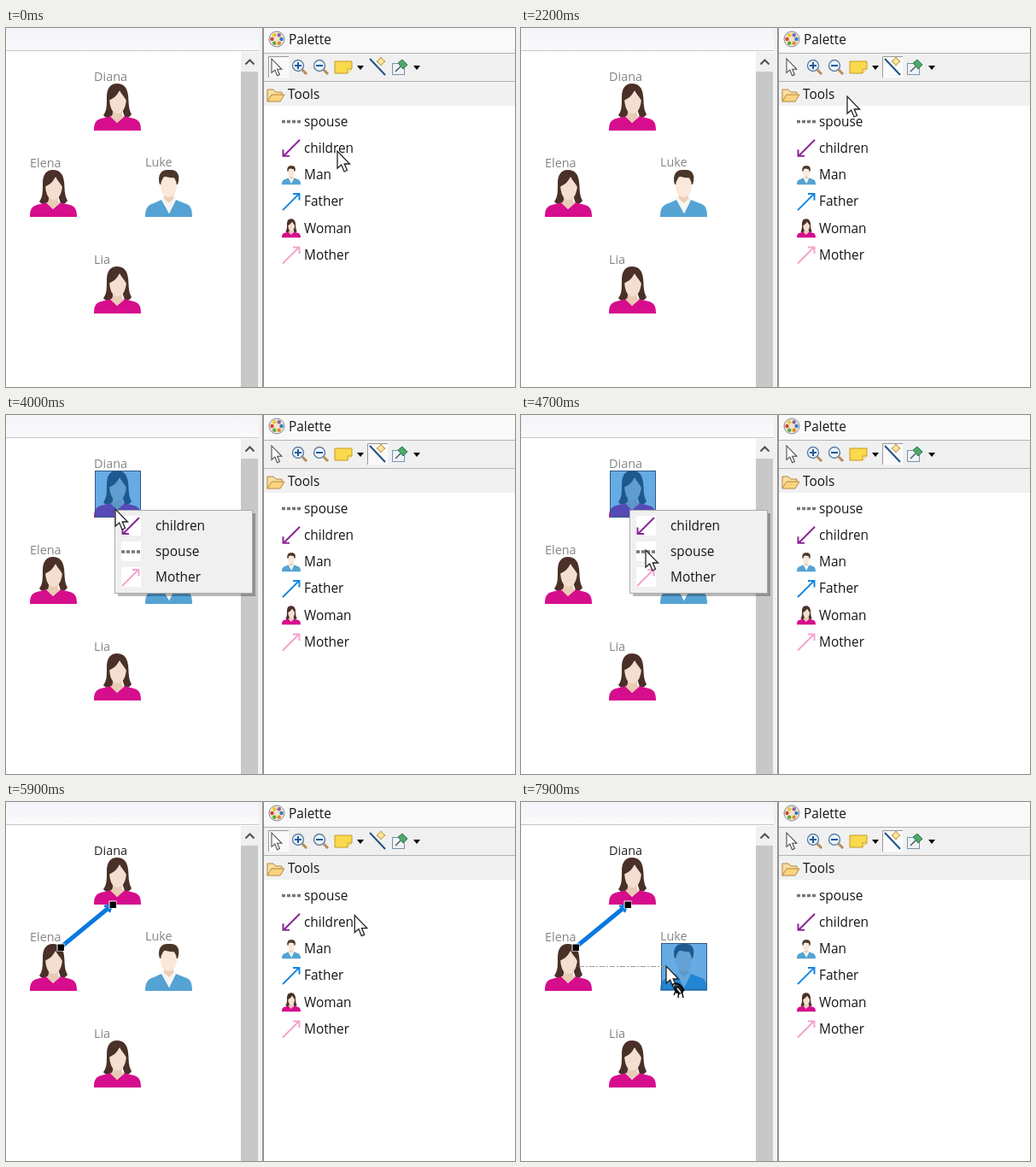
Animation of 596x420 px, one loop 8 s. Source, as an HTML page:

```html
<!DOCTYPE html>
<html lang="en">
<head>
<meta charset="utf-8">
<title>Connection tool</title>
<style>
html, body { margin: 0; width: 100%; height: 100%; overflow: hidden; background: #fff; }
svg { display: block; width: 596px; height: 420px; }
text { font: 15.4px "Open Sans", "Noto Sans", sans-serif; fill: #161616; }
.label { font-size: 14.4px; fill: #858585; }
.tip { font-size: 14px; }
.thin { fill: none; stroke: #999; stroke-width: 1; }
</style>
</head>
<body>
<svg viewBox="0 0 596 420">
  <defs>
    <linearGradient id="tab" x2="0" y2="1"><stop stop-color="#f3f4f8"/><stop offset="1" stop-color="#fafafc"/></linearGradient>
    <g id="woman">
      <path fill="#4a3028" d="M27 0C18 0 15 7 15 16C15 26 15 32 11 37C14 41 18 41 21 39L23 30H33L36 39C39 41 42 39 44 36C40 29 41 22 40 14C39 5 35 0 27 0Z"/>
      <path fill="#d60d8c" d="M0 55C0 46 2 43 8 41L20 38L27 46L35 38L47 41C53 43 55 46 55 55Z"/>
      <path fill="#e9cbb6" d="M22 27V37L19 38.500L27 46L36 38.500L33 37V27Z"/>
      <path fill="#f3dfcf" d="M18 15C18 27 21 35 27.500 35C34 35 38 27 38 16L31 8Z"/>
      <path fill="#4a3028" d="M17 20C24 17 28 13 30 7C31 12 36 15 39 22C40 8 35 3 28 3C20 3 16 10 17 20Z"/>
    </g>
    <g id="man">
      <path fill="#4a3629" d="M17 18C14 6 19 0 28 1C37 0 42 6 38 18Z"/>
      <path fill="#55a3d4" d="M0 56C0 46 3 42 10 40L19 36L28 52L36 36L46 40C53 42 55 46 55 56Z"/>
      <path fill="#f8f5f2" d="M19 35L28 52L36 35L34 31H21Z"/>
      <path fill="#ebcfb9" d="M22 28V35L28 40L33 35V28Z"/>
      <ellipse cx="27.5" cy="20" rx="9.5" ry="13" fill="#fae8da"/>
      <path fill="#4a3629" d="M17 17C15 6 20 2 28 2C36 2 40 7 38 17L35 10C30 11 25 9 21 8Z"/>
    </g>
    <!-- Arrow icon in a 22px box, pointing up and right -->
    <path id="arrow" d="M1 21L20 2M13 2H20.5V9.500" fill="none" stroke-width="2"/>
    <path id="dashes" d="M0 11H22" stroke="#777" stroke-width="3.5" stroke-dasharray="4 2"/>
    <path id="pointer" d="M0 0V20L4.7 16L8 24L11.5 22.5L8.2 15H14.5Z" fill="#fff" stroke="#222" stroke-width="1.3"/>
    <g id="handle"><rect x="-5" y="-5" width="9" height="9" fill="#fff"/><rect x="-4" y="-4" width="7.5" height="7.5"/></g>
    <g id="lens" fill="none">
      <path d="M5 5L10 10" stroke="#b98a55" stroke-width="3"/>
      <circle r="6.5" fill="#eaf4fc" stroke="#5f7f9d" stroke-width="1.4"/>
      <path d="M-4 0H4" stroke="#1d5a9a" stroke-width="2"/>
    </g>
    <path id="drop" d="M-4 -2H4L0 3Z"/>
    <g id="plug" stroke="#000" fill="none">
      <path d="M7 22Q13 18 18 24L21 29M9 25L13 32" stroke-width="1.8"/>
      <path d="M10 25L16 22L20 30L15 33Z" fill="#222"/>
      <path d="M12 27L9 34M15 28L14 37M18 28L20 37" stroke-width="1.4"/>
      <path d="M13 26L17 31" stroke="#fff" stroke-width="1.5"/>
    </g>
    <g id="forbidden" fill="#fff" stroke="#000" stroke-width="2.8">
      <circle cx="29.500" cy="11.500" r="7.7"/><path d="M24 17L35 6"/>
    </g>
  </defs>

  <rect width="596" height="420" fill="#fff"/>
  <rect width="297" height="26" fill="url(#tab)"/>
  <path d="M0 26.5H297" stroke="#c3c5c9"/>
  <rect x="275" y="28" width="21" height="392" fill="#f0f0f0"/>
  <rect id="thumb" x="275" y="51" width="20" height="369"/>
  <path d="M280.500 42.500L285.5 37.5L290.500 42.500" fill="none" stroke="#505050" stroke-width="2"/>
  <rect x="296" width="5" height="420" fill="#f1f1f1"/>

  <rect x="301" width="295" height="29" fill="#f9f9fa"/>
  <rect x="301" y="30" width="295" height="32" fill="#f0f0f0"/>
  <rect x="301" y="63" width="295" height="28" fill="#f1f1f2"/>
  <path d="M301 29.5H596M301 62.5H596" stroke="#b4b4b4"/>
  <path d="M301 0V420" stroke="#929292" stroke-width="2"/>
  <circle cx="317" cy="13" r="9" fill="#f1e6c8" stroke="#7d8da8"/>
  <g id="paints"></g>
  <text x="331" y="19">Palette</text>

  <g id="pressed">
    <rect x=".5" y="33.5" width="23" height="24" fill="#f9f9f9" stroke="#fff"/>
    <path d="M.5 58V33.5H24" fill="none" stroke="#999"/>
  </g>
  <g opacity=".8"><use href="#pointer" transform="translate(311 36) scale(.82)"/></g>
  <use href="#lens" x="342" y="44"/><path d="M342 40V48" stroke="#1d5a9a" stroke-width="2"/>
  <use href="#lens" x="367" y="44"/>
  <path d="M385 39H405V48L400 53H385Z" fill="#fbd94c" stroke="#c79a2b"/><path d="M405 48H400V53" fill="#fff0a8" stroke="#c79a2b"/>
  <use href="#drop" x="415" y="46"/><use href="#drop" x="481" y="46"/>
  <path d="M426 36L444 55" stroke="#1f5285" stroke-width="2"/>
  <path d="M439 34L441 37L444 39L441 41L439 44L437 41L434 39L437 37Z" fill="#ffe9a0" stroke="#c08c30"/>
  <rect x="452.500" y="41.500" width="14" height="13" fill="#eef3f8" stroke="#7894ab"/>
  <path d="M456 51L462 45" stroke="#555" stroke-width="1.5"/>
  <path d="M459 41L464 37L470 43L465 48Z" fill="#4fa86a" stroke="#287849"/>

  <path d="M306 86V72H313L316 75H323V78" fill="#f7dfa0" stroke="#b78438"/>
  <path d="M306 86L311 78H326L321 86Z" fill="#fbd480" stroke="#b78438"/>
  <text x="330" y="83">Tools</text>
  <g id="tools"></g>
  <g id="people"></g>

  <g id="link">
    <path d="M64 170L123 121.500" stroke="#0878e0" stroke-width="5"/>
    <path d="M115 122L124 120.500L121 129" fill="none" stroke="#0878e0" stroke-width="2.5"/>
    <use href="#handle" x="64.500" y="170.500"/><use href="#handle" x="125.500" y="120.500"/>
  </g>
  <rect id="target" width="53" height="54" fill="#0073d2" fill-opacity=".6" stroke="#315a88"/>
  <path id="edge" class="thin" d="M83.500 165V213" stroke-dasharray="5 2"/>
  <path id="feedback" class="thin" stroke-dasharray="6 2 2 2"/>

  <g id="menu">
    <g id="menuBack">
      <rect x="131" y="115" width="161" height="97" fill="#000" opacity=".28"/>
      <rect x="127.500" y="111.500" width="161" height="97" fill="#f0f0f0" stroke="#aaa"/>
    </g>
    <rect id="hover" x="131" y="174" width="154" height="31" fill="#a9d2f5"/>
    <g id="menuItems"></g>
  </g>

  <g id="tooltip">
    <rect x="438.500" y="60.500" width="170" height="61" fill="#ffffe1" stroke="#777"/>
    <text class="tip" x="444" y="78">Generic connection</text>
    <text class="tip" x="444" y="96">creation tool: select</text>
    <text class="tip" x="444" y="114">source and target</text>
  </g>
  <g id="cursor"><use href="#pointer"/><use id="plugMark" href="#plug"/><use id="noDrop" href="#forbidden"/></g>
</svg>
<script>
const $ = id => document.getElementById(id);
const icon = (name, x, y, extra = "") => `<use href="#${name}" transform="translate(${x} ${y}) ${extra}"/>`;
const toolIcon = {
  spouse: (x, y) => icon("dashes", x, y),
  children: (x, y) => `<g stroke="#8b2797">${icon("arrow", x, y, "rotate(180 11 11)")}</g>`,
  Man: (x, y) => icon("man", x, y, "scale(.4)"),
  Father: (x, y) => `<g stroke="#1385e2">${icon("arrow", x, y)}</g>`,
  Woman: (x, y) => icon("woman", x, y, "scale(.4)"),
  Mother: (x, y) => `<g stroke="#f3a3cc">${icon("arrow", x, y)}</g>`
};
const people = [
  { name: "Diana", kind: "woman", x: 103, y: 65 },
  { name: "Elena", kind: "woman", x: 28, y: 166 },
  { name: "Luke", kind: "man", x: 163, y: 165 },
  { name: "Lia", kind: "woman", x: 103, y: 279 }
];

$("paints").innerHTML = ["#3a78c9", "#e5862d", "#56a845", "#d6453d", "#efc52f", "#8a63b0"].map((color, i) =>
  `<circle cx="${317 + 5.5 * Math.cos(i * Math.PI / 3)}" cy="${13 + 5.5 * Math.sin(i * Math.PI / 3)}" r="2.2" fill="${color}"/>`).join("");
$("tools").innerHTML = Object.keys(toolIcon).map((name, i) =>
  toolIcon[name](323, 98.5 + 31.2 * i) + `<text x="349" y="${114.8 + 31.2 * i}">${name}</text>`).join("");
$("people").innerHTML = people.map(p =>
  icon(p.kind, p.x, p.y) + `<text class="label" x="${p.x}" y="${p.y - 3.5}">${p.name}</text>`).join("");
$("menuItems").innerHTML = ["children", "spouse", "Mother"].map((name, i) =>
  `<g><rect x="135" y="${118 + 30 * i}" width="23" height="23" fill="#fff"/>` +
  toolIcon[name](135, 119 + 30 * i) + `<text x="175" y="${135 + 30 * i}">${name}</text></g>`).join("");
const menuItems = [...$("menuItems").children];
const firstLabel = $("people").querySelector("text");

// Pointer path: time, x, y
const path = [
  [0, 388, 144], [300, 388, 144], [400, 392, 142], [700, 437, 43], [2100, 437, 43], [2200, 382, 80],
  [2500, 200, 130], [2900, 62, 192], [3000, 62, 192], [3200, 93, 163], [3600, 128, 110], [4400, 128, 110],
  [4900, 158, 190], [5300, 158, 190], [6000, 450, 123], [6400, 437, 43], [6600, 437, 43], [6700, 370, 78],
  [6900, 181, 168], [7400, 66, 192], [7500, 66, 192], [7900, 170, 192], [8000, 170, 192]
];
function pointerAt(t) {
  const i = path.findIndex(p => p[0] > t);
  const [t0, x0, y0] = path[i - 1], [t1, x1, y1] = path[i];
  const k = (t - t0) / (t1 - t0);
  return [x0 + (x1 - x0) * k, y0 + (y1 - y0) * k];
}
const within = (t, from, to) => t >= from && t < to;
const show = (id, on) => $(id).style.display = on ? "" : "none";

function draw(t) {
  const [x, y] = pointerAt(t);
  const connecting = within(t, 1900, 5400) || t >= 6400;
  const menuOpen = within(t, 3800, 5200);
  const closing = within(t, 5200, 5400);
  const onCanvas = connecting && x < 275 && !menuOpen && !closing;
  const hit = menuOpen ? people[0] : onCanvas && people.find(p =>
    x >= p.x && x <= p.x + 55 && y >= p.y + 4 && y <= p.y + 55);

  $("cursor").setAttribute("transform", `translate(${x} ${y})`);
  show("plugMark", onCanvas);
  show("noDrop", onCanvas && !hit);
  $("pressed").setAttribute("transform", `translate(${connecting ? 423 : 307} 0)`);
  $("thumb").style.fill = within(t, 6800, 7100) ? "#aaa" : "#c8c8c8";
  show("tooltip", within(t, 1000, 1700));

  show("target", hit && !(t >= 7600 && hit === people[1]));
  if (hit) $("target").setAttribute("transform", `translate(${hit.x + 1.5} ${hit.y + .5})`);
  show("edge", within(t, 3200, 3300));
  show("feedback", within(t, 3300, 3800) || t >= 7600);
  $("feedback").setAttribute("d", `M68 192.500L${x} ${y + .5}`);

  show("menu", menuOpen || closing);
  show("menuBack", menuOpen);
  show("hover", closing || menuOpen && y > 174);
  menuItems.forEach((item, i) => item.style.display = menuOpen || i === 2 ? "" : "none");
  $("menu").style.opacity = closing ? .8 - (t - 5200) / 250 : Math.min(1, .4 + (t - 3800) / 330);

  show("link", t >= 5400);
  firstLabel.style.fill = t >= 5400 ? "#222" : "";
}
function frame() {
  // The pointer advances ten times a second.
  draw(Math.floor(performance.now() % 8000 / 100) * 100);
  requestAnimationFrame(frame);
}
frame();
</script>
</body>
</html>
```
